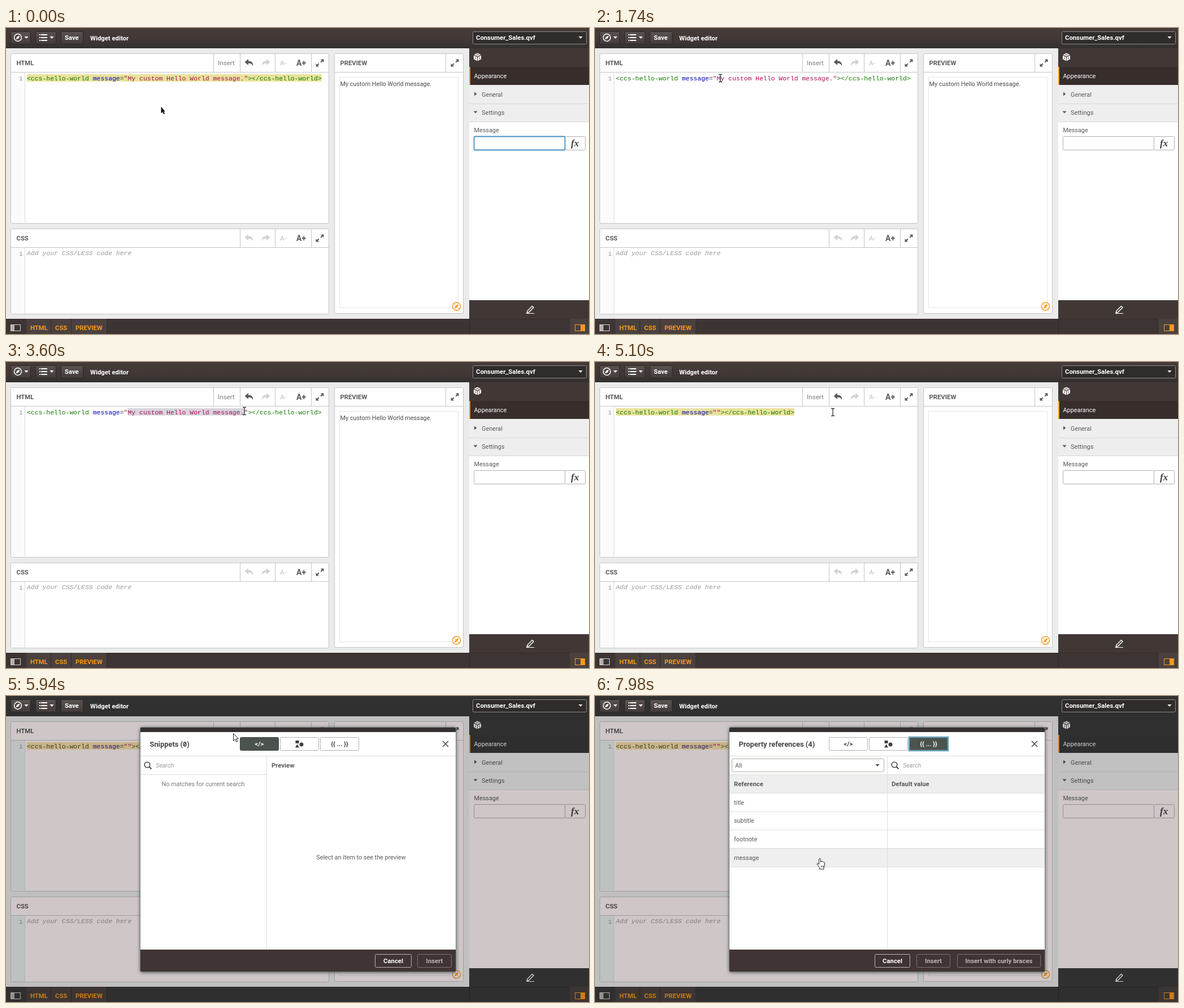
These frames come from a looping animation (1032 by 543 pixels, 8000 ms). An HTML page:

```html
<!DOCTYPE html>
<html lang="en">
<head>
<meta charset="utf-8">
<title>Widget editor</title>
<style>
html, body { margin: 0; height: 100%; overflow: hidden; background: #ebebeb; }
svg { display: block; width: 100vw; height: 100vh;
  --w: #fff; --g: #fbfbfb; --hl: #e9e39b; --tag: #117700; --attr: #0000bb;
  --bar: #413836; --row: #372d2b; --foot: #3d3533; --top1: #463b39; --top2: #403836; --top3: #323030;
  font: 10.85px Roboto, "Open Sans", sans-serif; }
svg.modal { --w: #fff4f6; --g: #e8edeb; --hl: #f7deac; --tag: #3a4f14; --attr: #2a1a80;
  --bar: #3c3b3b; --row: #393838; --foot: #3b3a3a; --top1: #323131; --top2: #313030; --top3: #2f2f2f; }
text { white-space: pre; }
.b { font-weight: 700; font-size: 11.3px; }
.i { font-style: italic; }
.m { text-anchor: middle; }
.code { font: 11.44px "Liberation Mono", "Courier New", monospace; }
.code.i { font-style: italic; }
.fx { font: italic 700 17px "Liberation Serif", "Times New Roman", serif; }
.title { font-weight: 700; font-size: 12.85px; }
.zero { font: 700 12px "Noto Sans Mono", monospace; }
#frame { filter: drop-shadow(0 0 1px #4d6a68) drop-shadow(0 1px 3px rgba(45, 60, 55, .8)); }
</style>
</head>
<body>
<svg id="stage" viewBox="0 0 1032 543"></svg>
<script>
const LOOP = 8000, STEP = 60, CHAR = 6.865, CODE_X = 37, MSG_X = CODE_X + 26 * CHAR;
const MSG = 'My custom Hello World message.';
const PRESS = 1560, DELETE = 4320, OPEN = 5940, TAB = 6780;
const BAR = 'var(--bar)', GREY = '#595959', LINE = '#c4c4c4', ORANGE = '#f8981d';

const rect = (x, y, w, h, fill, stroke, r = 0, id = '') => {
  const o = stroke ? .5 : 0;
  return `<rect id="${id}" x="${x + o}" y="${y + o}" width="${w - 2 * o}" height="${h - 2 * o}" rx="${r}"
    style="fill:${fill};stroke:${stroke || 'none'}"/>`;
};
const text = (x, y, s, fill = GREY, cls = '', size = '') =>
  `<text x="${x}" y="${y}" class="${cls}" style="fill:${fill};${size && `font-size:${size}px`}">${s}</text>`;
const path = (d, fill, stroke = 'none', width = 1) =>
  `<path d="${d}" style="fill:${fill};stroke:${stroke};stroke-width:${width}"/>`;
const hline = (x, y, w, c = LINE) => rect(x, y, w, 1, c);
const vline = (x, y, h, c = LINE) => rect(x, y, 1, h, c);
const move = (dx, dy, s) => `<g transform="translate(${dx} ${dy})">${s}</g>`;
const group = (id, s) => `<g id="${id}">${s}</g>`;
const caret = (x, y, c) => path(`M${x - 3.5} ${y - 2}h7l-3.5 4z`, c);

const expand = path('M557 55.5h5.5v5.5l-2-2-2.5 2.5-1.5-1.5 2.5-2.5zM554 68.5h-5.5v-5.5l2 2 2.5-2.5 1.5 1.5-2.5 2.5z', GREY);
const undo = c => path('M429 55l-6.5 5.5 6.5 5.5v-3.5q6-.5 8 5q1-9-8-9z', c);
const tools = undoColor =>
  [414, 476, 540].map(x => vline(x, 46, 32)).join('') + undo(undoColor) +
  `<g transform="translate(890 0) scale(-1 1)">${undo('#d2d2d2')}</g>` +
  text(485, 66, 'A-', '#cfcfcf', 'b') + text(514, 67, 'A+', GREY, 'b', 14) + expand;
const panel = (x, y, w, h, name) =>
  rect(x, y, w, h, 'var(--w)', LINE, 2) + hline(x, y + 33, w) + text(x + 10.5, y + 20.5, name, GREY, 'b');
const gutter = (y, h) => rect(9, y, 24, h, 'var(--g)') + vline(33, y, h, '#dcdcdc') +
  text(23, y + 14, '1', '#999', 'code');

function topBar() {
  const button = (x, w) => rect(x, 6, w, 23, 'url(#button)', '#2b2625', 2);
  return rect(0, 0, 1032, 36, 'url(#bar)') +
    button(8, 36) + button(52, 37) + button(97, 40) +
    '<circle cx="21" cy="17" r="6.4" fill="none" stroke="#fff" stroke-width="1.5"/>' +
    path('M24.5 13.5l-2 5-5 2 2-5z', '#fff') + caret(36, 17, '#fff') +
    [12, 17, 22].map(y => rect(59, y - 1, 2, 2, '#fff') + rect(62, y - 1, 11, 2, '#fff')).join('') +
    caret(81, 17, '#fff') +
    text(104, 21, 'Save', '#fff', 'b') + text(149, 21.5, 'Widget editor', '#fff', 'b') +
    rect(826, 6, 202, 23, '#302c2b', '#918b89', 2) +
    text(832, 20.5, 'Consumer_Sales.qvf', '#fff', 'b') + caret(1017, 17, '#fff');
}

function editors() {
  const span = (c, s) => `<tspan style="fill:${c}">${s}</tspan>`;
  const line = (id, msg) => group(id, text(CODE_X, 92.5,
    span('var(--tag)', '&lt;ccs-hello-world ') + span('var(--attr)', 'message') + span('#333', '=') +
    span('#aa1155', `"${msg}"`) + span('var(--tag)', '&gt;&lt;/ccs-hello-world&gt;'), '#333', 'code'));
  return panel(8, 45, 564, 302, 'HTML') + vline(367, 46, 32) + text(375, 66, 'Insert', '#7d7d7d', '', 11.7) +
    tools(GREY) + gutter(79, 266) +
    rect(CODE_X, 82, 10, 13, 'var(--hl)', '', 0, 'match') +
    rect(MSG_X, 82, 0, 13, '#d9d6dd', '', 0, 'selection') +
    line('full', MSG) + line('empty', '') +
    panel(8, 356, 564, 152, 'CSS') + move(0, 311, tools('#d2d2d2')) + gutter(390, 117) +
    text(CODE_X, 402.5, 'Add your CSS/LESS code here', '#999', 'code i') +
    panel(581, 45, 229, 462, 'PREVIEW') + vline(778, 46, 32) + move(239, 0, expand) +
    rect(590, 87, 211, 410, 'none', '#e4e4e4') +
    group('preview', text(591.5, 103, MSG, '#4a4a4a')) +
    `<circle cx="797.5" cy="494" r="7" fill="#fff" stroke="${ORANGE}" stroke-width="1.5"/>` +
    path('M794 497.5l.5-2.5 5-5 2 2-5 5z', ORANGE) + path('M793 489.5l9 9', 'none', ORANGE);
}

function sidebar() {
  return rect(820, 36, 212, 33, BAR) + rect(820, 69, 212, 32, 'var(--row)') +
    rect(820, 69, 2, 32, ORANGE) +
    path('M834.5 44.5l6 3-6 3-6-3zM828 48.8l6 3v6.7l-6-3.2zM841 48.8l-6 3v6.7l6-3.2z', '#fff') +
    path('M831 51.5v4M838 51.5v4M832 47.5h5', 'none', BAR) +
    text(828.5, 88.5, 'Appearance', '#fff') +
    rect(820, 101, 212, 65, '#eeeeee') + hline(820, 134, 212, '#d9d9d9') + hline(820, 166, 212, '#d9d9d9') +
    rect(820, 167, 212, 316, 'var(--w)') +
    path('M829 113.5v7l4.5-3.5z', GREY) + text(842, 121.5, 'General') +
    caret(831, 149.5, GREY) + text(842, 153.5, 'Settings', GREY, '', 11.1) +
    text(828.5, 185, 'Message') +
    rect(828, 192, 162, 25, 'var(--w)', '#b3b0ad', 2) + rect(989, 192, 37, 25, 'var(--w)', '#b3b0ad', 2) +
    group('focus', '<rect x="828.5" y="192.5" width="161" height="24" rx="2" fill="#fff" stroke="#4591bf" stroke-width="1.8"/>') +
    text(1000, 210, 'fx', '#404040', 'fx') +
    rect(820, 483, 212, 33, BAR) +
    path('M923 502l8.5-8.5 2.5 2.5-8.5 8.5-3.3.8z', 'none', '#fff', 1.4) + hline(921, 506, 14, '#fff');
}

function footer() {
  const tab = (x, w, s) => rect(x, 516, w, 27, '#4a413f') + vline(x + w, 516, 27, '#352d2b') +
    text(x + 7, 535.5, s, ORANGE, 'b');
  return rect(0, 516, 1032, 27, 'var(--foot)') + hline(0, 516, 1032, '#342d2b') +
    rect(8, 526, 18, 12, 'none', '#d5d1d0') + rect(9, 527, 6, 10, '#b5b0ae') +
    tab(36, 43, 'HTML') + tab(80, 35, 'CSS') + tab(116, 62, 'PREVIEW') +
    vline(820, 516, 27, '#2d2625') + rect(998, 516, 34, 27, '#4a413f') +
    rect(1007, 526, 18, 12, 'none', ORANGE) + rect(1017, 527, 7, 10, ORANGE);
}

function dialog() {
  const tabs = on => [414, 485, 556].map((x, i) => {
    const c = i === on ? '#fff' : '#404040', cx = x + 34.5;
    const icon = [
      text(cx, 89, '&lt;/&gt;', c, 'b m'),
      rect(cx - 7, 79, 6, 5, c) + path(`M${cx - 4} 85.5l3.5 6h-7z`, c) + `<circle cx="${cx + 3.5}" cy="86" r="3.5" fill="${c}"/>`,
      text(cx, 89, '{{ ... }}', c, 'b m')
    ][i];
    const glow = i === on && i ? path(`M${x} 73h69v24h-69z`, 'none', '#6aa3bb', 2.6) : '';
    return rect(x, 73, 69, 24, i === on ? '#4b534f' : '#fff', i === on ? '#3b4440' : '#b0b0b0', 2) + glow + icon;
  }).join('');
  const search = x => `<circle cx="${x - 1}" cy="122" r="4.8" fill="none" stroke="#444" stroke-width="1.6"/>` +
    path(`M${x + 2.5} 125.5l4 4`, 'none', '#444', 2) + text(x + 14, 127, 'Search', '#999', 'i');
  const button = (x, w, s, on) => rect(x, 458, w, 24, 'none', on ? '#b9b4b2' : '#7d7573', 2) +
    text(x + w / 2, 473.5, s, on ? '#fff' : '#bbb5b3', 'b m');
  const snippets = text(254.5, 89.5, 'Snippets (<tspan class="zero">0</tspan>)', '#444', 'title') + tabs(0) + search(251) +
    hline(238, 139, 223, '#ddd') + vline(461, 106, 344, '#ddd') +
    text(349, 160, 'No matches for current search', '#777', 'm') +
    text(470, 126.5, 'Preview', GREY, 'b') +
    text(628.5, 290, 'Select an item to see the preview', GREY, 'm') +
    button(653, 65, 'Cancel', true) + button(728, 61, 'Insert');
  const rows = ['title', 'subtitle', 'footnote', 'message'];
  const refs = text(254.5, 89.5, 'Property references (4)', '#444', 'title') + tabs(2) +
    rect(242, 111, 270, 24, '#fff', '#b3b0a8', 2) + text(248, 127, 'All') + caret(500, 123, '#444') + search(531) +
    rect(238, 139, 558, 33, '#eeeeee') + hline(238, 139, 558, '#ddd') +
    text(246, 160, 'Reference', GREY, 'b') + text(525, 160, 'Default value', GREY, 'b') +
    rect(238, 0, 558, 32, '#efefef', '', 0, 'hover') +
    [172, 205, 237, 270, 303].map(y => hline(238, y, 558, '#ddd')).join('') +
    rows.map((s, i) => text(246, 192.7 + 32.7 * i, s)).join('') + vline(517, 106, 344, '#ddd') +
    button(495, 63, 'Cancel', true) + button(569, 60, 'Insert') + button(641, 148, 'Insert with curly braces');
  return group('dialog',
    rect(0, 36, 1032, 507, 'rgba(0,0,0,.19)') +
    rect(238, 56, 558, 433, '#403534', '', 2, 'frame') + rect(238, 56, 558, 8, '#333030', '', 2) +
    rect(238, 64, 558, 386, '#fff') + hline(238, 106, 558, '#ddd') +
    path('M773 80l10 10M783 80l-10 10', 'none', '#444', 1.5) +
    group('snippets', snippets) + group('refs', refs));
}

// Pointer shapes, hot spot at 0,0
const arrow = 'M.5.5v13l3-2.8 2 4.8 2.2-1-2-4.6h4z';
const pointers =
  group('dark', path('M.5.5v12l2.7-2.5 1.8 4 2-.9-1.8-3.9h2.5z', '#111')) +
  group('arrow', path(arrow, '#fff', '#222')) +
  group('beam', path('M-3-6.5h2q1 0 1 1 0-1 1-1h2M0-5.5v11M-3 6.5h2q1 0 1-1 0 1 1 1h2', 'none', '#333', 1.3)) +
  group('hand', path('M-1.5 1.2q1.5-1.8 2.8 0v5.3l.3-.8q1.4-.8 2.4.4 1.3-.6 2.2.6 1.6-.6 2.3 1v5l-1.5 3.5v3h-7.5v-2.5l-4-5.5q-1-1.8.5-2.3 1-.2 2.5 2z', '#fff', '#222') +
    path('M2.5 13v3M4.5 13v3M6.5 13v3', 'none', '#222', .8));

const $ = id => document.getElementById(id);
const svg = $('stage');
const stop = (offset, color) => `<stop offset="${offset}" style="stop-color:${color}"/>`;
svg.innerHTML = `<defs>
  <linearGradient id="bar" x2="0" y2="1">${stop(0, 'var(--top1)') + stop(.6, 'var(--top2)') + stop(1, 'var(--top3)')}</linearGradient>
  <linearGradient id="button" x2="0" y2="1">${stop(0, '#5a5351') + stop(1, '#433c3a')}</linearGradient>
  </defs>` + rect(0, 36, 820, 480, '#ebebeb') + topBar() + editors() + sidebar() + footer() + dialog() +
  group('pointer', pointers);

// Stops of the pointer: time, x, y
const route = [
  [0, 274, 139], [240, 274, 139], [900, 219, 89], [1140, 219, 89], [1380, 215, 89], [1600, 215, 89],
  [2833, 422, 89], [3400, 422, 87], [4800, 421, 89], [5300, 421, 89], [5800, 402, 66],
  [6060, 402, 66], [6600, 590, 85], [6900, 590, 85], [7620, 398, 288], [LOOP, 398, 288]
];
function pointerAt(t) {
  const i = Math.max(1, route.findIndex(p => p[0] >= t));
  const [t0, x0, y0] = route[i - 1], [t1, x1, y1] = route[i];
  const u = (t - t0) / (t1 - t0), s = u * u * (3 - 2 * u);
  return [x0 + (x1 - x0) * s, y0 + (y1 - y0) * s];
}
const show = (id, on) => { $(id).style.display = on ? '' : 'none'; };

function render(t) {
  const [x, y] = pointerAt(t);
  const open = t >= OPEN, refs = t >= TAB, deleted = t >= DELETE;
  svg.classList.toggle('modal', open);

  show('focus', t < PRESS);
  show('full', !deleted);
  show('empty', deleted);
  show('preview', !deleted);
  show('match', t < PRESS || deleted);
  $('match').setAttribute('width', CHAR * (deleted ? 46 : 76));
  const picked = Math.floor((pointerAt(Math.max(0, t - 40))[0] - MSG_X) / CHAR);
  show('selection', t >= PRESS && !deleted);
  $('selection').setAttribute('width', CHAR * Math.min(MSG.length, Math.max(0, picked)));

  show('dialog', open);
  show('snippets', !refs);
  show('refs', refs);
  const row = Math.floor((y - 172) / 32.7), onRow = refs && row >= 0 && row < 4;
  show('hover', onRow);
  $('hover').setAttribute('y', 173 + 32.6 * row);

  const shape = t <= 240 ? 'dark' : onRow ? 'hand' : t > 1140 && !open && y > 78 ? 'beam' : 'arrow';
  for (const id of ['dark', 'arrow', 'beam', 'hand']) show(id, id === shape);
  $('pointer').setAttribute('transform', `translate(${Math.round(x)} ${Math.round(y)})`);
}

const start = performance.now();
function tick() {
  const t = (performance.now() - start) % LOOP;
  render(Math.floor(t / STEP) * STEP);
  requestAnimationFrame(tick);
}
tick();
</script>
</body>
</html>
```
